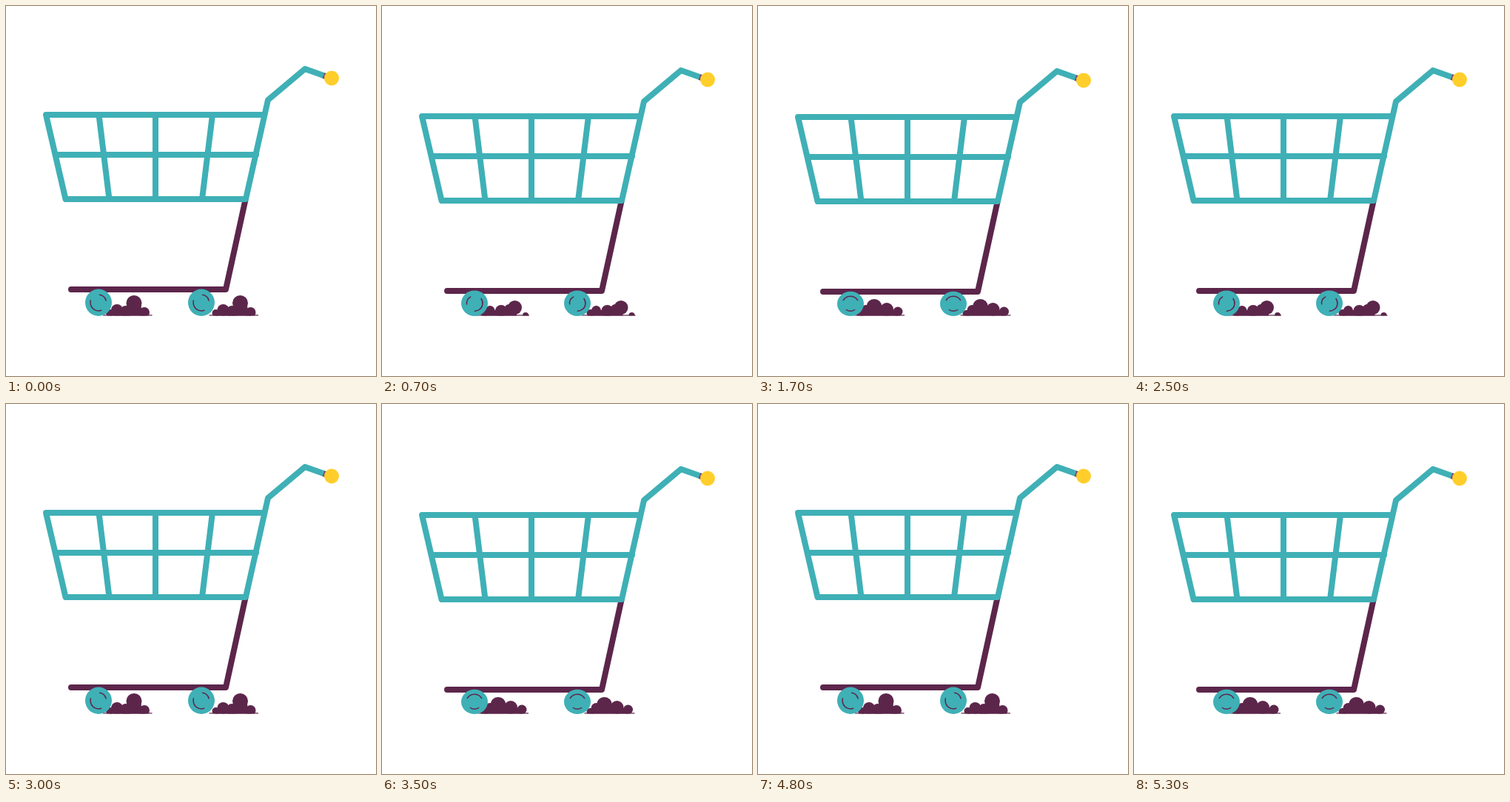
Recreate the animation shown at these times as an HTML page with a canvas. Size 500 px wide and 500 px high, loop 5.4 s.

```html
<!DOCTYPE html>
<html lang="en">
<head>
<meta charset="utf-8">
<title>Rolling cart</title>
<style>
html, body { margin: 0; width: 100%; height: 100%; overflow: hidden; background: #fff; }
canvas { display: block; }
</style>
</head>
<body>
<canvas id="stage" width="500" height="500"></canvas>
<script>
const ctx = document.getElementById('stage').getContext('2d');
const TEAL = '#3fb0b6', PLUM = '#5c264b', YELLOW = '#ffce2b';
const STEP = 100, GROUND = 418.5;

// Each pose: body drop, wheel half-height, spin in degrees, dust span and puffs [x, y, r].
const POSES = [
  { drop: 0, wheel: 18.2, spin: 222, dust: [131, 197.5], core: [140, 188],
    puffs: [[140, 415, 5], [150, 411, 8], [162, 413, 8], [173, 401.5, 10.5], [173, 408, 10], [187, 414, 7]] },
  { drop: 2, wheel: 17.3, spin: 116, dust: [126, 199], core: [138, 182],
    puffs: [[138, 415, 5], [146, 411.5, 6.5], [161, 412, 8], [172, 410, 7], [179.5, 407.5, 9.5], [194, 418, 4]] },
  { drop: 3, wheel: 16.6, spin: 0, dust: [130, 198], core: [138, 189],
    puffs: [[138, 416, 5], [146, 411, 7], [157, 406.5, 10.5], [174, 410, 9], [189, 413, 6.5]] }
];

function line(color, points, width = 8, cap = 'round') {
  ctx.strokeStyle = color;
  ctx.lineWidth = width;
  ctx.lineCap = cap;
  ctx.lineJoin = 'round';
  ctx.beginPath();
  points.forEach(([x, y]) => ctx.lineTo(x, y));
  ctx.stroke();
}

function disc(color, x, y, rx, ry = rx) {
  ctx.fillStyle = color;
  ctx.beginPath();
  ctx.ellipse(x, y, rx, ry, 0, 0, Math.PI * 2);
  ctx.fill();
}

function arc(radius, from, to) {
  const rad = Math.PI / 180;
  ctx.beginPath();
  ctx.arc(0, 0, radius, from * rad, to * rad);
  ctx.stroke();
}

function drawDust(pose, dx) {
  ctx.save();
  ctx.translate(dx, 0);
  ctx.beginPath();
  ctx.rect(0, 0, 500, GROUND);
  ctx.clip();
  pose.puffs.forEach(puff => disc(PLUM, ...puff));
  const [left, right] = pose.core;
  ctx.fillRect(left, 411, right - left, 8);
  ctx.fillRect(pose.dust[0], 417.3, pose.dust[1] - pose.dust[0], 2);
  ctx.restore();
}

function drawWheel(pose, x) {
  const y = 419 - pose.wheel;
  disc(TEAL, x, y, 18, pose.wheel);
  ctx.save();
  ctx.translate(x, y);
  ctx.scale(1, pose.wheel / 18);
  ctx.rotate(pose.spin * Math.PI / 180);
  ctx.strokeStyle = PLUM;
  ctx.lineWidth = 1.5;
  ctx.lineCap = 'round';
  arc(11, 208, 332);
  arc(10.5, 57, 123);
  ctx.restore();
}

function drawBody(drop) {
  ctx.save();
  ctx.translate(0, drop);
  line(PLUM, [[323.5, 262], [297, 383], [88, 383]]);
  line(TEAL, [[349, 147], [54, 147], [80.5, 261], [324, 261], [354, 127], [404, 85], [430, 94.3]]);
  line(TEAL, [[67, 201], [338, 201]]);
  line(TEAL, [[125.5, 147], [139.5, 261]]);
  line(TEAL, [[202, 147], [202, 261]]);
  line(TEAL, [[279, 147], [265, 261]]);
  line('#75457f', [[429, 94], [436, 96.5]], 8, 'butt');
  disc(YELLOW, 440, 97.5, 10);
  ctx.restore();
}

function draw(now) {
  const pose = POSES[Math.floor(now / STEP) % POSES.length];
  ctx.fillStyle = '#fff';
  ctx.fillRect(0, 0, 500, 500);
  [0, 143.5].forEach(dx => drawDust(pose, dx));
  drawBody(pose.drop);
  [125, 264].forEach(x => drawWheel(pose, x));
}

const start = performance.now();
function tick() {
  draw(performance.now() - start);
  requestAnimationFrame(tick);
}
tick();
</script>
</body>
</html>
```
